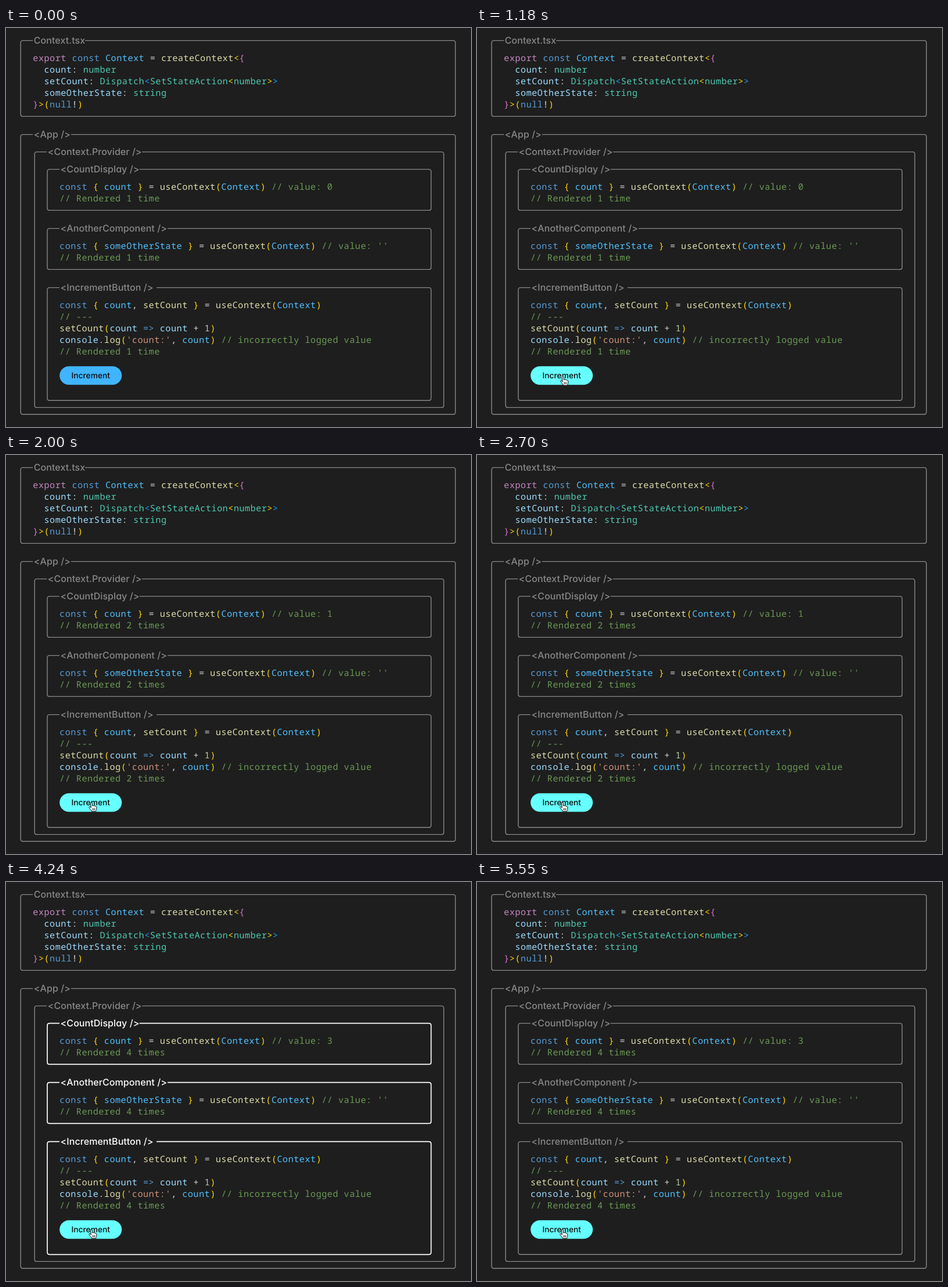
An HTML page that plays this animation: 800 by 688 pixels, repeating every 5.58 s.

```html
<!DOCTYPE html>
<html lang="en">
<head>
<meta charset="utf-8">
<title>Context rendering</title>
<style>
  html, body { margin: 0; width: 100%; height: 100%; overflow: hidden; background: #1e1e1e; }
  svg { display: block; width: 100vw; height: 100vh; }
  text { white-space: pre; text-rendering: geometricPrecision; }
  .code { font: 500 15.2px "Noto Sans Mono", "DejaVu Sans Mono", monospace; letter-spacing: .48px; }
  .label, .button { font-family: Inter, "Open Sans", sans-serif; font-weight: 500; font-feature-settings: "cv11"; }
  .label { font-size: 16px; letter-spacing: .06px; fill: #888; }
  .box { fill: none; stroke: #888; stroke-width: 1.4; }
  .flash .label { fill: #fff; }
  .flash .box { stroke: #fff; stroke-width: 1.7; }
  .button { font-size: 13.8px; text-anchor: middle; fill: #0c0c0c; }
</style>
</head>
<body>
<svg id="stage" viewBox="0 0 800 688" xmlns="http://www.w3.org/2000/svg">
  <rect width="800" height="688" fill="#1e1e1e"/>
  <g id="panels"></g>
  <rect id="pill" x="92.2" y="583.2" width="107" height="32" rx="16" fill="#40b4ff"/>
  <text class="button" x="145.8" y="604.2">Increment</text>
  <g id="cursor">
    <path id="arrow" d="M0 0V13.2L3 10.4L5 15L7.2 14L5.2 9.6H9.4Z" fill="#000" stroke="#fff" stroke-width="1"/>
    <g id="hand" stroke="#000" stroke-width="1" stroke-linejoin="round" stroke-linecap="round">
      <path fill="#fff" d="M-1.4 1.3C-1.4 -.4 1.3 -.4 1.4 1.3L1.8 6C2.2 4.7 4.4 4.8 4.6 6.2C5.2 5.2 7 5.4 7.2 6.9C8 6.3 9.2 6.8 9.2 8.2V11C9.2 12.7 8.2 13.4 8 15.5H1C.8 13.7 -1.6 11.8 -3.1 9.6C-4.6 7.6 -3.2 6.6 -1.8 7.6L-.5 8.8Z"/>
      <path fill="none" stroke-width=".8" d="M2.4 10.2V13.3M4.3 10.2V13.3M6.2 10.2V13.3"/>
    </g>
  </g>
</svg>
<script>
const LOOP = 5580;
const CLICKS = [1380, 2790, 4200];
const FLASH = 540;
const LINE = 20;

const COLORS = {
  p: '#c586c0', k: '#569cd6', c: '#4fc1ff', f: '#dcdcaa', v: '#9cdcfe', t: '#4ec9b0',
  w: '#d4d4d4', y: '#ffd700', m: '#da70d6', b: '#179fff', g: '#6a9955', s: '#ce9178', n: '#b5cea8'
};

const RENDERED = 'g|// Rendered |R|';

// Code lines alternate colour keys and text; R and N are live values.
const PANELS = [
  { name: 'Context.tsx', box: [25.2, 21.6, 773.2, 152.4], end: 136, lines: [
    'p|export |k|const |c|Context |w|= |f|createContext|y|<|m|{',
    'v|  count|w|: |t|number',
    'v|  setCount|w|: |t|Dispatch|b|<|t|SetStateAction|y|<|t|number|y|>|b|>',
    'v|  someOtherState|w|: |t|string',
    'm|}|y|>(|k|null|w|!|y|)'
  ] },
  { name: '<App />', box: [25.2, 183.6, 773.2, 666.3], end: 112, lines: [] },
  { name: '<Context.Provider />', box: [49.2, 213.6, 753.2, 654.4], end: 234, lines: [] },
  { name: '<CountDisplay />', box: [71, 243.6, 731.4, 314.4], end: 229.5, live: true, lines: [
    'k|const |y|{ |c|count |y|} |w|= |f|useContext|y|(|c|Context|y|)|g| // value: |N|',
    RENDERED
  ] },
  { name: '<AnotherComponent />', box: [71, 345.6, 731.4, 416.4], end: 278, live: true, lines: [
    "k|const |y|{ |c|someOtherState |y|} |w|= |f|useContext|y|(|c|Context|y|)|g| // value: ''",
    RENDERED
  ] },
  { name: '<IncrementButton />', box: [71, 447.6, 731.4, 642.3], end: 259, live: true, lines: [
    'k|const |y|{ |c|count|w|, |f|setCount |y|} |w|= |f|useContext|y|(|c|Context|y|)',
    'g|// ---',
    'f|setCount|y|(|v|count |k|=> |v|count |w|+ |n|1|y|)',
    "v|console|w|.|f|log|y|(|s|'count:'|w|, |c|count|y|)|g| // incorrectly logged value",
    RENDERED
  ] }
];

const $ = id => document.getElementById(id);
const live = { R: [], N: [] };
const flashing = [];

function add(parent, tag, attrs, text) {
  const el = document.createElementNS('http://www.w3.org/2000/svg', tag);
  for (const key in attrs) el.setAttribute(key, attrs[key]);
  if (text) el.textContent = text;
  return parent.appendChild(el);
}

function addCode(parent, line, x, y) {
  const text = add(parent, 'text', { class: 'code', x, y });
  const parts = line.split('|');
  for (let i = 0; i < parts.length; i += 2) {
    const key = parts[i];
    const span = add(text, 'tspan', { fill: COLORS[key] || COLORS.g }, parts[i + 1]);
    if (live[key]) live[key].push(span);
  }
}

function addPanel(panel) {
  const [l, t, r, b] = panel.box;
  const q = 4;
  const g = add($('panels'), 'g', {});
  add(g, 'path', { class: 'box', d:
    `M${panel.end} ${t}H${r - q}Q${r} ${t} ${r} ${t + q}V${b - q}Q${r} ${b} ${r - q} ${b}` +
    `H${l + q}Q${l} ${b} ${l} ${b - q}V${t + q}Q${l} ${t} ${l + q} ${t}H${l + 21}` });
  add(g, 'text', { class: 'label', x: l + 22.6, y: t + 5.6 }, panel.name);
  panel.lines.forEach((line, i) => addCode(g, line, l + 21.1, t + 35.6 + i * LINE));
  if (panel.live) flashing.push(g);
}

const clamp = v => Math.max(0, Math.min(1, v));
const easeOut = v => 1 - (1 - v) ** 2;

function pointer(t) {
  const enter = easeOut(clamp((t - 720) / 440));
  const settle = clamp((t - 1190) / 120);
  return { x: 174 - 26.4 * enter - settle, y: 692 - 91.2 * enter - 1.6 * settle };
}

let shown = -1;

function draw(now) {
  const t = now % LOOP;
  const count = CLICKS.filter(c => t >= c).length;
  const lit = CLICKS.some(c => t >= c && t < c + FLASH);

  if (count !== shown) {
    shown = count;
    live.N.forEach(el => { el.textContent = count; });
    live.R.forEach(el => { el.textContent = `${count + 1} time${count ? 's' : ''}`; });
  }
  flashing.forEach(g => g.classList.toggle('flash', lit));

  const { x, y } = pointer(t);
  const hover = y < 615;
  $('cursor').setAttribute('transform', `translate(${x} ${y})`);
  $('arrow').style.display = hover ? 'none' : '';
  $('hand').style.display = hover ? '' : 'none';
  $('pill').setAttribute('fill', hover ? '#66ffff' : '#40b4ff');
}

function tick() {
  draw(performance.now());
  requestAnimationFrame(tick);
}

PANELS.forEach(addPanel);
tick();
</script>
</body>
</html>
```
